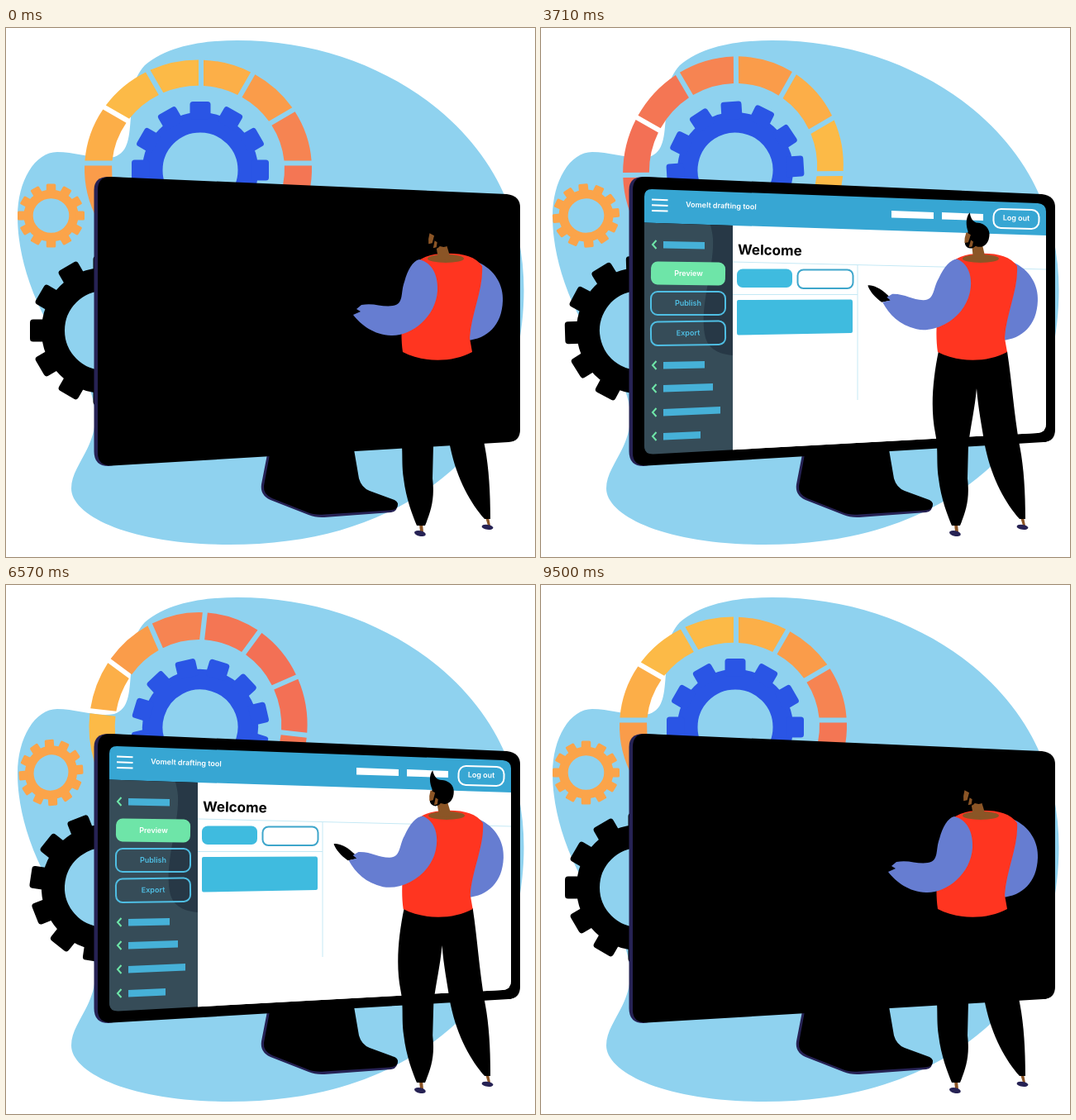
An HTML page for the animation above (9570 ms loop, 640x640 px).

```html
<!DOCTYPE html>
<html lang="en">
<head>
<meta charset="utf-8">
<title>Screen and gears</title>
<style>
  html, body { margin: 0; width: 100%; height: 100%; overflow: hidden; background: #fff; }
  svg { display: block; width: 100vw; height: 100vh; }
  text { font: 600 9px Inter, sans-serif; }
  .mid { text-anchor: middle; }
  .line { fill: none; stroke-width: 2; }
</style>
</head>
<body>
<svg viewBox="0 0 640 640">
  <defs>
    <clipPath id="glass"><path d="M134 195L601 212Q611 213 611 222V479Q611 489 601 490L136 515.5Q125 516 125 506V204Q125 195 134 195Z"/></clipPath>
    <clipPath id="sideArea"><path d="M125 235.5L232 239V511L125 517Z"/></clipPath>
  </defs>

  <path fill="#8fd2ef" d="M280 15C430 15 555 95 602 200C630 260 632 330 618 395C605 450 575 500 546 529C480 590 390 625 270 625C150 625 79 590 79 557C79 530 108 510 108 470C108 420 60 380 44 345C22 300 14 260 14 228C14 185 35 150 62 150C85 150 110 160 131 156C149 150 149 130 151 108C151 85 152 62 168 45C197 21 240 15 280 15Z"/>
  <g id="ring"></g>
  <g id="blueGear" fill="#2a55e5" stroke="#2a55e5"></g>
  <g id="smallGear" fill="#fba44a" stroke="#fba44a"></g>
  <g id="blackGear" fill="#000" stroke="#000"></g>

  <g fill="#262254">
    <path d="M316 516L309 552Q307 565 320 571L366 589Q374 592.5 385 592L466 586Q474 585 474 575L400 560V512Z"/>
    <path d="M124 180Q106.500 180 106.500 196V512Q106.500 530 124 530L300 500V190Z"/>
  </g>
  <path d="M319 516L421 510L427 545Q430 556 440 560L470 571Q476 574 473 580Q471 583 465 583.500L385 588.500Q373 589.500 365 586L322 569Q311 564 312 554Z"/>
  <path d="M126 180L606 201Q622 203 622 217V486Q622 500 608 501L128 529.500Q111 530 111 514V196Q111 180 126 180Z"/>

  <g clip-path="url(#glass)">
    <path class="glow" fill="#fff" d="M232 238L611 251V292L232 283ZM232 396C270 390 300 376 330 382C370 392 371 440 385 465C397 486 440 491 480 487L611 478V520H232Z"/>
    <g id="screen">
      <path fill="#fff" d="M232 230H612V520H232Z"/>
      <path fill="#37a6d3" d="M125 190H611V251L125 235.5Z"/>
      <path fill="#364c58" d="M125 235.500L232 239V511L125 517Z"/>
      <path clip-path="url(#sideArea)" fill="#060c1c" opacity=".3" d="M175 195C192 205 206 230 208 255C210 290 190 340 199 375C204 391 220 395 232 396V195Z"/>
      <text x="238" y="274" style="font-size:17px;font-weight:700" transform="rotate(1 238 274)">Welcome</text>
      <path class="line" style="stroke-width:1" stroke="#c5e9f5" d="M232 283L611 292M383 287V450M232 322.500H383"/>
      <rect fill="#3fbbdf" x="237" y="291.500" width="67" height="22.500" rx="7"/>
      <rect class="line" stroke="#3ea6cb" x="310.500" y="292.500" width="67" height="22.500" rx="7"/>
      <path fill="#3fbbdf" d="M239 329L375 328.500Q377 328.500 377 331V367Q377 369 375 369L239 371.500Q237 371.500 237 369V331Q237 329 239 329Z"/>
      <rect fill="#6ee5a8" x="133" y="283" width="90" height="28" rx="8" transform="rotate(.8 178 297)"/>
      <g class="line" stroke="#4fbee3">
        <rect x="133" y="319" width="90" height="28" rx="8"/>
        <rect x="133" y="355" width="90" height="28.500" rx="8" transform="rotate(-.8 178 369)"/>
      </g>
      <g class="mid" fill="#4fbee3">
        <text x="178" y="336">Publish</text>
        <text x="178" y="372" transform="rotate(-.8 178 369)">Export</text>
      </g>
      <g id="menu"></g>
    </g>
    <g class="glow" fill="#fff">
      <path class="line" stroke="#fff" d="M134 207.500L153.500 208.300M134 214.300L153.500 214.900M134 220.900L153.500 221.400"/>
      <path d="M424 221L475 223V231L424 229.500ZM485 223L535 225V233L485 231.500Z"/>
      <rect class="line" stroke="#fff" x="547.500" y="219.500" width="55" height="23" rx="9" transform="rotate(1.500 575 231)"/>
      <text x="175" y="216.500" transform="rotate(2 175 216)">Vomelt drafting tool</text>
      <text class="mid" x="575" y="233" transform="rotate(1.500 575 231)">Log out</text>
      <text class="mid" x="178.500" y="300">Preview</text>
    </g>
  </g>

  <g id="man">
    <g fill="#8b5526"><path d="M500 600H504L505 610H501Z"/><path d="M580 592H584L586 602H583Z"/></g>
    <g fill="#262254">
      <ellipse cx="501" cy="611.500" rx="7" ry="3.300" transform="rotate(12 501 611)"/>
      <ellipse cx="582.500" cy="603.800" rx="7" ry="3" transform="rotate(8 582 604)"/>
    </g>
    <path d="M481 391C474 425 471 460 477 490C481 510 478 525 481 545C484 570 492 590 497 602H507C514 585 519 570 516 545L517 505C520 480 525 460 527 436C529 460 533 480 537 505C545 545 562 575 579 594H586C586 560 584 530 579 505C572 465 570 430 564 391Z"/>
    <path fill="#667dd1" d="M570 283C592 292 602 312 601 330C600 360 582 376 558 378Z"/>
    <path fill="#ff3520" d="M500 281C508 275 520 273 530 273C550 272 568 276 576 288C578 315 563 345 561 375L564 392C540 405 505 405 480 392C476 365 480 330 490 300Z"/>
    <ellipse fill="#8b5526" cx="532" cy="279" rx="22" ry="5"/>
    <g id="head">
      <path fill="#8b5526" d="M520 260L532 258L538 279H523Z"/>
      <path d="M516 224C511 230 512 240 515 247L512 262C514 268 521 269 525 264C536 268 542 258 541 248C540 240 532 236 527 236C520 236 517 230 516 224Z"/>
      <path fill="#8b5526" d="M513 248L518.500 251L516 260L511.500 261V255ZM519 257L522 259L521 265L517 266Z"/>
    </g>
    <g id="arm">
      <path d="M399 330C404 328 414 331 421 335C426 338 430 341 430 343L419 347C410 343 402 336 399 330Z"/>
      <path fill="#667dd1" d="M500 280C516 284 523 300 522 318C520 350 490 373 466 372C445 371 430 360 420 347L429 343L424 340L430 335C445 332 455 338 468 336C482 334 477 320 482 307C486 292 492 282 500 280Z"/>
    </g>
  </g>
</svg>

<script>
const LOOP = 9570, FPS = 14, LENGTH = 9.5;
const el = id => document.getElementById(id);
const glows = document.querySelectorAll('.glow');
const smooth = x => x * x * (3 - 2 * x);

// Ring: twelve blocks on an ellipse; the gaps spread from a point beside its centre
const OUTER = [137.5, 132], INNER = [104.5, 100.7], HUB = [3.5, -7], HALF_GAP = 3;
const SHADES = ['#f47654', '#f37055', '#f37055', '#f47654', '#f68452', '#fa9c4a',
  '#fcae48', '#fcba47', '#fcba47', '#fcaf48', '#fa9c4a', '#f68452'];

function edgePoint(step, side, [a, b]) {
  const angle = step * Math.PI / 6, dx = Math.cos(angle), dy = Math.sin(angle);
  const px = HUB[0] - dy * side, py = HUB[1] + dx * side;
  const A = (dx / a) ** 2 + (dy / b) ** 2;
  const B = px * dx / a ** 2 + py * dy / b ** 2;
  const C = (px / a) ** 2 + (py / b) ** 2 - 1;
  const k = (-B + Math.sqrt(B * B - A * C)) / A;
  return [px + k * dx, py + k * dy];
}

el('ring').innerHTML = SHADES.map((shade, i) => {
  const from = r => edgePoint(i, HALF_GAP, r), to = r => edgePoint(i + 1, -HALF_GAP, r);
  return `<path fill="${shade}" d="M${from(OUTER)}A${OUTER} 0 0 1 ${to(OUTER)}` +
    `L${to(INNER)}A${INNER} 0 0 0 ${from(INNER)}Z"/>`;
}).join('');

function buildGear(id, hole, body, tip, tooth, squash = 1) {
  let parts = `<circle fill="none" r="${(hole + body) / 2}" stroke-width="${body - hole}"/>`;
  for (let i = 0; i < 12; i++)
    parts += `<rect stroke="none" x="${-tooth / 2}" y="${-tip}" width="${tooth}" ` +
      `height="${tip - body + tooth / 3}" rx="${tooth / 7}" transform="rotate(${i * 30})"/>`;
  el(id).innerHTML = `<g transform="scale(1 ${squash})">${parts}</g>`;
}
buildGear('blueGear', 45.5, 70, 83, 25);
buildGear('smallGear', 21.8, 33, 40.5, 11.5, .95);
buildGear('blackGear', 48, 76, 90, 27);

// Menu rows: top, bar width, slope
el('menu').innerHTML = [[262, 50, 1], [408, 50, -1], [436, 60, -2], [465, 69, -3], [494, 45, -2]]
  .map(([y, w, slope]) =>
    `<path class="line" stroke="#6ee5a8" d="M139.500 ${y - 5}L135 ${y}L139.500 ${y + 5}"/>` +
    `<path fill="#46b1d8" d="M148 ${y - 4}l${w} ${slope}v8.500l${-w} ${-slope}z"/>`).join('');

function keyed(values, u) {
  const x = u * (values.length - 1), i = Math.min(Math.floor(x), values.length - 2);
  return values[i] + (values[i + 1] - values[i]) * smooth(x - i);
}

function draw(ms) {
  const sec = Math.floor((ms % LOOP + 1) * FPS / 1000) / FPS;
  const u = Math.min(sec / LENGTH, 1), eased = smooth(u);
  const spin = (id, x, y, turns) =>
    el(id).setAttribute('transform', `translate(${x} ${y}) rotate(${360 * turns})`);
  spin('ring', 232.5, 170.5, .93 * eased + .07 * u);
  spin('blueGear', 235, 172, 2 * eased);
  spin('smallGear', 54.5, 227, 3 * eased);
  spin('blackGear', 119, 366, eased);

  const fade = Math.max(0, Math.min(1, sec / 1.05, (LENGTH - sec) / 1.05));
  el('screen').setAttribute('opacity', fade);
  glows.forEach(glow => glow.setAttribute('opacity', Math.min(1, fade * 1.14)));

  const lean = -keyed([0, 6, -5, 2, 0], u) / 327;
  el('man').setAttribute('transform', `matrix(1 0 ${lean} 1 ${-lean * 605} 0)`);
  el('head').setAttribute('transform', `rotate(${keyed([-1, 8, -1, -1, -1], u)} 531 278)`);
  el('arm').setAttribute('transform', `rotate(${keyed([0, 12, 8, 9, 0], u)} 505 300)`);
}

function tick() {
  draw(performance.now());
  requestAnimationFrame(tick);
}
tick();
</script>
</body>
</html>
```
